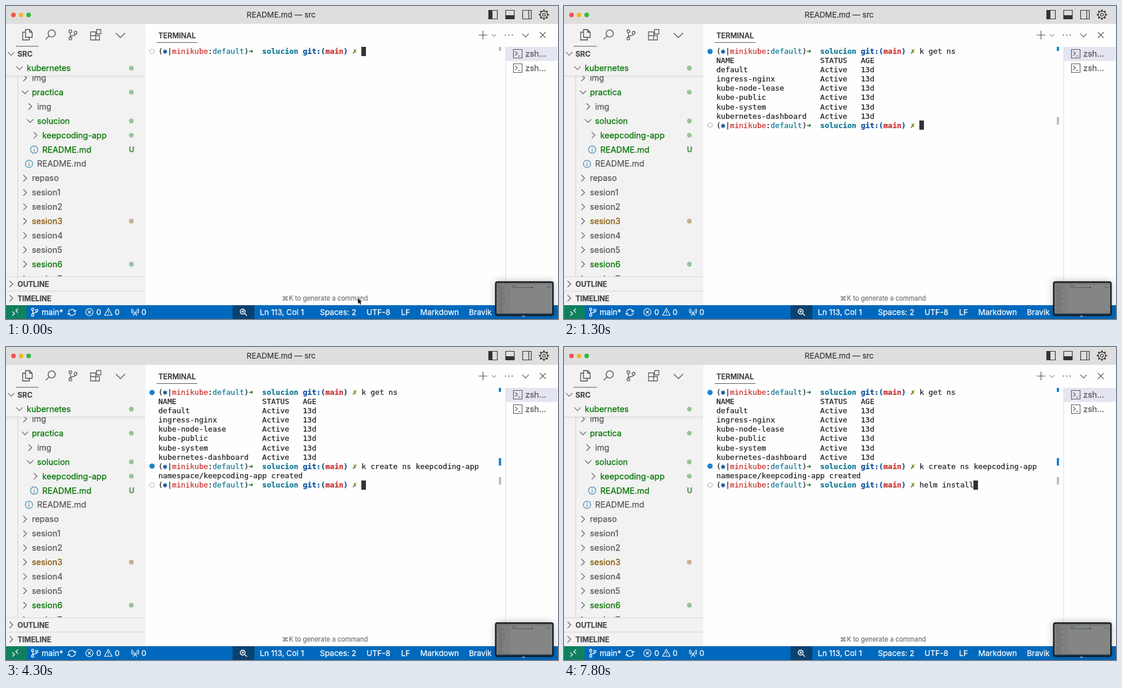
Recreate the animation shown at these times as an HTML page with a canvas. Size 960 px wide and 544 px high, loop 8000 ms.

```html
<!DOCTYPE html>
<html lang="en">
<head>
<meta charset="utf-8">
<title>README.md — src</title>
<style>
  html, body { margin: 0; width: 100%; height: 100%; overflow: hidden; background: #fff; }
  canvas { display: block; }
</style>
</head>
<body>
<canvas id="stage" width="960" height="544"></canvas>
<script>
const ctx = document.getElementById("stage").getContext("2d");
const LOOP = 8000;
const UI = "Inter, sans-serif";
const MONO = '"DejaVu Sans Mono", "DejaVu Sans", monospace';
const INK = "#222", GRAY = "#585858", GREEN = "#007400", BROWN = "#895503";
const RED = "#c9302f", CYAN = "#0f7794", BLUE = "#0b4f9e";

// Terminal grid
const LEFT = 265, TOP = 71, COL = 7.85, ROW = 16.05;

const PROMPT = [
  ["(", INK], ["✱", BLUE, 1], ["|", INK], ["minikube", RED], [":", INK], ["default", CYAN], [")", INK],
  ["➜", "#107c10", 1], ["  ", INK], ["solucion", CYAN, 1], [" ", INK], ["git:(", BLUE, 1],
  ["main", RED, 1], [")", BLUE, 1], [" ", INK], ["✗", "#77700a", 1], [" ", INK]
];

const namespaces = ["default", "ingress-nginx", "kube-node-lease", "kube-public", "kube-system", "kubernetes-dashboard"];
const tableRow = (name, status, age) => name.padEnd(23) + status.padEnd(9) + age;

// keys: [time in ms, number of characters typed]
const COMMANDS = [
  {
    text: "k get ns", enter: 1300, done: 1300,
    keys: [[500, 1], [600, 2], [700, 3], [800, 5], [900, 6], [1100, 7], [1200, 8]],
    output: [tableRow("NAME", "STATUS", "AGE"), ...namespaces.map(n => tableRow(n, "Active", "13d"))]
  },
  {
    text: "k create ns keepcoding-app", enter: 4200, done: 4300,
    keys: [[1500, 1], [1600, 2], [2900, 4], [3000, 6], [3100, 9], [3300, 10], [3400, 11], [3800, 12], [3900, 26]],
    output: ["namespace/keepcoding-app created"]
  },
  {
    text: "helm install", enter: Infinity, done: Infinity,
    keys: [[6900, 2], [7000, 3], [7100, 4], [7200, 5], [7300, 7], [7400, 8], [7500, 10], [7700, 11], [7800, 12]],
    output: []
  }
];

// [label, indent level, marker (">" closed, "v" open, "i" file), color, badge]
const TREE = [
  ["img", 2, ">", GRAY], ["practica", 2, "v", GREEN, "dot"], ["img", 3, ">", GRAY],
  ["solucion", 3, "v", GREEN, "dot"], ["keepcoding-app", 4, ">", GREEN, "dot"],
  ["README.md", 4, "i", GREEN, "U"], ["README.md", 3, "i", GRAY], ["repaso", 2, ">", GRAY],
  ["sesion1", 2, ">", GRAY], ["sesion2", 2, ">", GRAY], ["sesion3", 2, ">", BROWN, "dot"],
  ["sesion4", 2, ">", GRAY], ["sesion5", 2, ">", GRAY], ["sesion6", 2, ">", GREEN, "dot"],
  ["sesion7", 2, ">", GRAY]
];

const ICONS = {
  ">": "M-2.8-5.5L2.8 0L-2.8 5.5",
  "v": "M-5.5-2.8L0 2.8L5.5-2.8",
  i: "M-6.3 0a6.3 6.3 0 1 0 12.6 0a6.3 6.3 0 1 0-12.6 0M0-3.6v1.6M0-.8V3.8",
  files: "M-3-9H4L8.5-4.5V4.5H-3ZM4-9V-4.5H8.5M-3-4.5H-8V9H3.5V4.5",
  search: "M-3 3a6.2 6.2 0 1 1 2 1.4a6.2 6.2 0 0 1-2-1.4L-9 9",
  branch: "M-4.5-3.5V4M4.5-1C4.5 3-4.5 0-4.5 4M-7-6a2.5 2.5 0 1 0 5 0a2.5 2.5 0 1 0-5 0M-7 6.5a2.5 2.5 0 1 0 5 0a2.5 2.5 0 1 0-5 0M2-3.5a2.5 2.5 0 1 0 5 0a2.5 2.5 0 1 0-5 0",
  blocks: "M-9-5H0V9H-9ZM-9 1.5H6.5V9H0M6.5 1.5V9M1.5-9H9V-1.5H1.5Z",
  plus: "M-7.5 0H7.5M0-7.5V7.5",
  close: "M-5-5L5 5M5-5L-5 5",
  shell: "M-7.5-7.5H7.5V7.5H-7.5ZM-4.5-4L-.5-.5L-4.5 3M0 4H4.5",
  remote: "M-5-1L-1 2.5L-5 6M5-6L1-2.5L5 1",
  sync: "M-6 0A6 5.5 0 0 1 5.5-2M6 0A6 5.5 0 0 1-5.5 2M7.5-4L5.7-1.2L2.5-2.5M-7.5 4L-5.7 1.2L-2.5 2.5",
  error: "M-6.3 0a6.3 6.3 0 1 0 12.6 0a6.3 6.3 0 1 0-12.6 0M-2.5-2.5L2.5 2.5M2.5-2.5L-2.5 2.5",
  warning: "M0-6L6.5 6H-6.5ZM0-2V2M0 3.3V4.5",
  tower: "M0-1L-3 6.5M0-1L3 6.5M-2 3.5H2M-2.5 1A3.2 3.2 0 0 1-2.5-4M2.5 1A3.2 3.2 0 0 0 2.5-4M-4.5 2.5A6 6 0 0 1-4.5-6M4.5 2.5A6 6 0 0 0 4.5-6",
  zoom: "M2.2 2.2a4.3 4.3 0 1 1 .1-.1L6.5 6.3M-3-1H1.4M-.8-3.2V1.2",
  window: "M-7.5-7.5H7.5V7.5H-7.5Z"
};
for (const name in ICONS) ICONS[name] = new Path2D(ICONS[name]);

function rect(x, y, w, h, color) {
  ctx.fillStyle = color;
  ctx.fillRect(x, y, w, h);
}

// A hairline outline gives the slightly heavy look of smoothed glyphs.
function glyphs(str, x, y, color) {
  ctx.fillStyle = ctx.strokeStyle = color;
  ctx.lineWidth = 0.25;
  ctx.fillText(str, x, y);
  ctx.strokeText(str, x, y);
}

function text(str, x, y, size, color, weight = 400, align = "left") {
  ctx.font = `${weight} ${size}px ${UI}`;
  ctx.textAlign = align;
  glyphs(str, x, y, color);
}

function icon(name, x, y, color, width = 1.1, scale = 1) {
  ctx.save();
  ctx.translate(x, y);
  ctx.scale(scale, scale);
  ctx.strokeStyle = color;
  ctx.lineWidth = width / scale;
  ctx.stroke(ICONS[name]);
  ctx.restore();
}

function disc(x, y, r, color, hollow) {
  ctx.beginPath();
  ctx.arc(x, y, r, 0, 2 * Math.PI);
  ctx.fillStyle = ctx.strokeStyle = color;
  ctx.lineWidth = 1.2;
  hollow ? ctx.stroke() : ctx.fill();
}

function titleBar() {
  rect(0, 0, 960, 31, "#dfdede");
  ["#f4544d", "#f5b52c", "#2fb942"].forEach((c, i) => disc(13 + 13.2 * i, 15.5, 4, c));
  text("README.md — src", 478.5, 20, 13.4, "#3c3c3c", 400, "center");
  for (const x of [847, 876.5, 906]) icon("window", x, 15, "#333", 1.2);
  rect(840, 8, 6, 14, "#333");
  rect(869, 16, 15, 6, "#333");
  rect(908.5, 8, 1.2, 14, "#333");
  disc(935.5, 15, 6.2, "#333", true);
  disc(935.5, 15, 2.5, "#333", true);
  ctx.lineWidth = 2.6;
  for (let i = 0; i < 8; i++) {
    const a = i * Math.PI / 4, dx = Math.cos(a), dy = Math.sin(a);
    ctx.beginPath();
    ctx.moveTo(935.5 + 6.2 * dx, 15 + 6.2 * dy);
    ctx.lineTo(935.5 + 8.8 * dx, 15 + 8.8 * dy);
    ctx.stroke();
  }
}

function badge(kind, y, color) {
  if (kind === "dot") disc(218, y, 4.2, color === BROWN ? "#c5b18f" : "#9bc19b");
  if (kind === "U") text("U", 218.5, y + 4.7, 12.8, "#478d47", 600, "center");
}

function sideBar() {
  rect(0, 31, 242, 489, "#f2f2f2");
  icon("files", 37, 50, "#454545", 1.3);
  icon("search", 78, 49, GRAY, 1.4);
  icon("branch", 116.5, 50, GRAY, 1.3);
  icon("blocks", 156, 50, GRAY, 1.3);
  icon("v", 199, 51, GRAY, 1.4, 1.45);
  rect(17, 69.5, 40, 1, "#555");

  icon("v", 9, 83, GRAY);
  text("SRC", 20, 87.7, 12.7, "#4a4a4a", 700);
  icon("v", 23.5, 108, GRAY);
  text("kubernetes", 36, 113, 14.4, GREEN);
  badge("dot", 108, GREEN);

  ctx.save();
  ctx.beginPath();
  ctx.rect(0, 122, 242, 348);
  ctx.clip();
  rect(20, 122, 1, 348, "#cfcfcf");
  TREE.forEach(([label, level, marker, color, mark], i) => {
    const x = 15 + 9 * level, y = 125 + 24.9 * i;
    icon(marker, marker === "i" ? x - 2 : x, y, marker === "i" ? "#3f86aa" : GRAY, 1.2);
    text(label, x + 12, y + 5, 14.4, color);
    badge(mark, y, color);
  });
  ctx.restore();
  rect(0, 121, 242, 1, "#d8d8d8");
  rect(0, 122, 242, 2, "rgba(0,0,0,.04)");

  [["OUTLINE", 483], ["TIMELINE", 508]].forEach(([label, y]) => {
    rect(0, y - 13, 242, 1, "#d6d6d6");
    icon(">", 9, y, GRAY);
    text(label, 20, y + 4.6, 12.5, "#4a4a4a", 700);
  });
}

function panel() {
  text("TERMINAL", 265, 55.7, 12.6, "#404040", 600);
  rect(262, 63, 71, 1, "#555");
  icon("plus", 829.5, 50.5, GRAY, 1.2);
  icon("v", 848.5, 51, GRAY, 1, 0.7);
  for (const x of [868.5, 874.5, 880.5]) disc(x, 50.5, 1.1, GRAY);
  icon("v", 903.5, 51, GRAY, 1.2);
  icon("close", 933.5, 50.5, GRAY, 1.2);

  rect(869, 71, 90, 24.5, "#e4e5f0");
  rect(868.5, 71, 1, 449, "#dcdcdc");
  for (const y of [83, 108]) {
    icon("shell", 890, y, GRAY, 1.1);
    text("zsh...", 903, y + 5, 14.4, GRAY);
  }
  text("⌘", 480, 511.5, 11.3, "#777");
  text("K to generate a command", 492, 511.5, 11.3, "#777");
}

function statusBar() {
  rect(0, 520, 960, 24, "#0069bd");
  rect(0, 520, 36, 24, "#11805f");
  rect(394, 520, 38, 24, "#0a416f");
  icon("remote", 16, 532, "#fff", 1.2);
  icon("branch", 50, 532, "#fff", 1.3, 0.8);
  icon("sync", 114.5, 532.5, "#fff", 1.2);
  icon("error", 145, 532, "#fff");
  icon("warning", 178, 531.5, "#fff");
  icon("tower", 224.5, 532, "#fff");
  icon("zoom", 412.5, 532, "#fff", 1.4);
  const items = [["main*", 62], ["0", 157], ["0", 189], ["0", 235.5], ["Ln 113, Col 1", 441.5], ["Spaces: 2", 546],
    ["UTF-8", 627], ["LF", 687], ["Markdown", 720.5], ["Bravik", 805]];
  for (const [label, x] of items) text(label, x, 537, 13.5, "#fff");
  disc(900, 537, 3, "#fff");
}

function thumbnail() {
  ctx.save();
  ctx.shadowColor = "rgba(0,0,0,.25)";
  ctx.shadowBlur = 14;
  ctx.fillStyle = "#17191c";
  ctx.beginPath();
  ctx.roundRect(850.5, 478.5, 102, 60, 4);
  ctx.fill();
  ctx.restore();
  rect(853, 481, 97, 55, "#848585");
  rect(853, 481, 97, 2.5, "#6e6f70");
  rect(853, 483.5, 24, 51, "#7e7f80");
  rect(853, 534, 97, 2, "#35506a");
  for (let i = 0; i < 17; i++) rect(855 + i % 3, 486 + 2.8 * i, 6 + i * 5 % 7, 0.8, "#5d6261");
  rect(880, 486, 7, 1, "#505050");
  rect(880, 489, 35, 1, "#575b5f");
  rect(914, 488, 1.5, 2.5, "#303030");
  rect(940, 488, 8, 1, "#606060");
}

function cells(str, col, row, color = INK, bold = false) {
  ctx.font = `${bold ? 700 : 400} 13.04px ${MONO}`;
  ctx.textAlign = "center";
  [...str].forEach((ch, i) => glyphs(ch, LEFT + (col + i + 0.5) * COL, TOP + row * ROW + 12.2, color));
  return col + str.length;
}

const caret = (col, row) => rect(Math.round(LEFT + col * COL), Math.round(TOP + row * ROW), 8, 16, "#333");

function terminal(t) {
  let row = 0;
  for (const { text: command, keys, enter, done, output } of COMMANDS) {
    const finished = t >= done, y = Math.round(TOP + row * ROW);
    disc(254, y + 8, finished ? 4.6 : 4, finished ? "#1a83d0" : "#b4b4b4", !finished);
    const markTop = Math.max(71, y - 6);
    rect(857, markTop, 4, y + 7 - markTop, finished ? "#1a83d0" : "#bdbdbd");

    let col = 0;
    for (const [str, color, bold] of PROMPT) col = cells(str, col, row, color, bold);
    const typed = keys.reduce((count, [time, n]) => t >= time ? n : count, 0);
    col = cells(command.slice(0, typed), col, row);

    if (!finished) {
      t < enter ? caret(col, row) : caret(0, row + 1);
      return;
    }
    output.forEach((line, i) => cells(line, 0, row + 1 + i));
    row += output.length + 1;
  }
}

function pointer() {
  const arrow = new Path2D("M612 507.5V517.5L614.3 515.4L616 519L617.6 518.2L616 514.8H619Z");
  ctx.strokeStyle = "#fff";
  ctx.lineWidth = 1.2;
  ctx.stroke(arrow);
  ctx.fillStyle = "#111";
  ctx.fill(arrow);
}

function draw(now) {
  const t = now % LOOP;
  rect(0, 0, 960, 544, "#fefefe");
  titleBar();
  sideBar();
  panel();
  terminal(t);
  statusBar();
  thumbnail();
  if (t < 100) pointer();
}

let start;
function frame(now) {
  start ??= now;
  draw(Math.max(0, now - start));
  requestAnimationFrame(frame);
}
requestAnimationFrame(frame);
</script>
</body>
</html>
```
